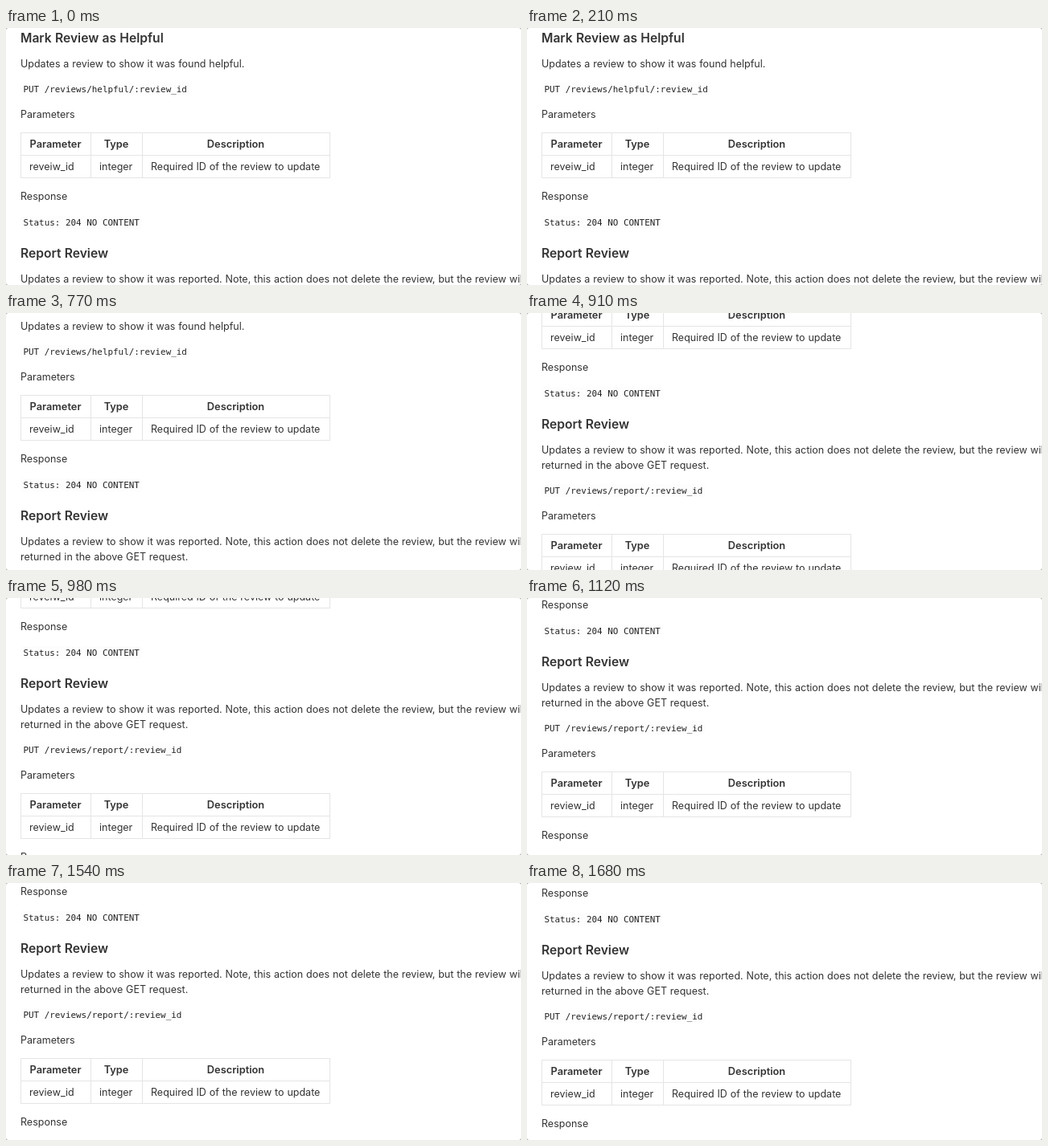
Write an HTML page that moves like this. It is 640x320 px and loops after 2030 ms.

```html
<!DOCTYPE html>
<html lang="en">
<head>
<meta charset="utf-8">
<title>API reference</title>
<style>
  html, body { margin: 0; width: 100%; height: 100%; overflow: hidden; background: #a8a8a8; }
  svg { display: block; width: 640px; height: 320px; background: #fff; border-radius: 3px; }
  text { font: 12.5px Inter, sans-serif; word-spacing: 0.34px; fill: #333; white-space: pre; }
  .title { font-size: 15.62px; font-weight: 600; }
  .head { font-size: 12.8px; font-weight: 600; text-anchor: middle; }
  .code { font: 10.92px "DejaVu Sans Mono", monospace; word-spacing: 0; fill: #222; }
  .chip { fill: #fdfdfd; }
  .grid { fill: none; stroke: #e5e5e5; }

  .page { animation: scroll 2030ms step-end infinite; }
  /* A flick down that overshoots, then settles back; sampled every 70 ms. */
  @keyframes scroll {
    0% { transform: translateY(0); }
    34.48% { transform: translateY(-3px); }
    37.93% { transform: translateY(-28px); }
    41.37% { transform: translateY(-87px); }
    44.82% { transform: translateY(-142px); }
    48.27% { transform: translateY(-174px); }
    51.72% { transform: translateY(-192px); }
    55.17% { transform: translateY(-201px); }
    62.06% { transform: translateY(-203px); }
    72.41% { transform: translateY(-201px); }
    75.86% { transform: translateY(-199px); }
    79.31% { transform: translateY(-198px); }
    82.75% { transform: translateY(-197px); }
  }
</style>
</head>
<body>
<svg viewBox="0 0 640 320">
  <defs>
    <g id="details">
      <text x="18" y="112">Parameters</text>
      <path class="grid" d="M18 130.5H403M18 158.5H403M18 186.5H403M18.5 130V187M105.5 130V187M169.5 130V187M402.5 130V187"/>
      <text class="head" x="61.5" y="149">Parameter</text>
      <text class="head" x="137" y="149">Type</text>
      <text class="head" x="285.5" y="149">Description</text>
      <text x="116" y="177">integer</text>
      <text x="180" y="177">Required ID of the review to update</text>
      <text x="18" y="214">Response</text>
      <rect class="chip" x="18" y="234" width="151" height="16" rx="3"/>
      <text class="code" x="21.4" y="246">Status: 204 NO CONTENT</text>
    </g>
  </defs>

  <g class="page">
    <text class="title" x="18" y="18">Mark Review as Helpful</text>
    <text x="18" y="49">Updates a review to show it was found helpful.</text>
    <rect class="chip" x="18" y="68" width="210" height="16" rx="3"/>
    <text class="code" x="21.4" y="80">PUT /reviews/helpful/:review_id</text>
    <use href="#details"/>
    <text x="29" y="177">reveiw_id</text>

    <text class="title" x="18" y="286">Report Review</text>
    <text x="18" y="317">Updates a review to show it was reported. Note, this action does not delete the review, but the review will not be</text>
    <text x="18" y="336">returned in the above GET request.</text>
    <rect class="chip" x="18" y="355" width="203" height="16" rx="3"/>
    <text class="code" x="21.4" y="367">PUT /reviews/report/:review_id</text>
    <use href="#details" y="287"/>
    <text x="29" y="464">review_id</text>
  </g>
</svg>
</body>
</html>
```
